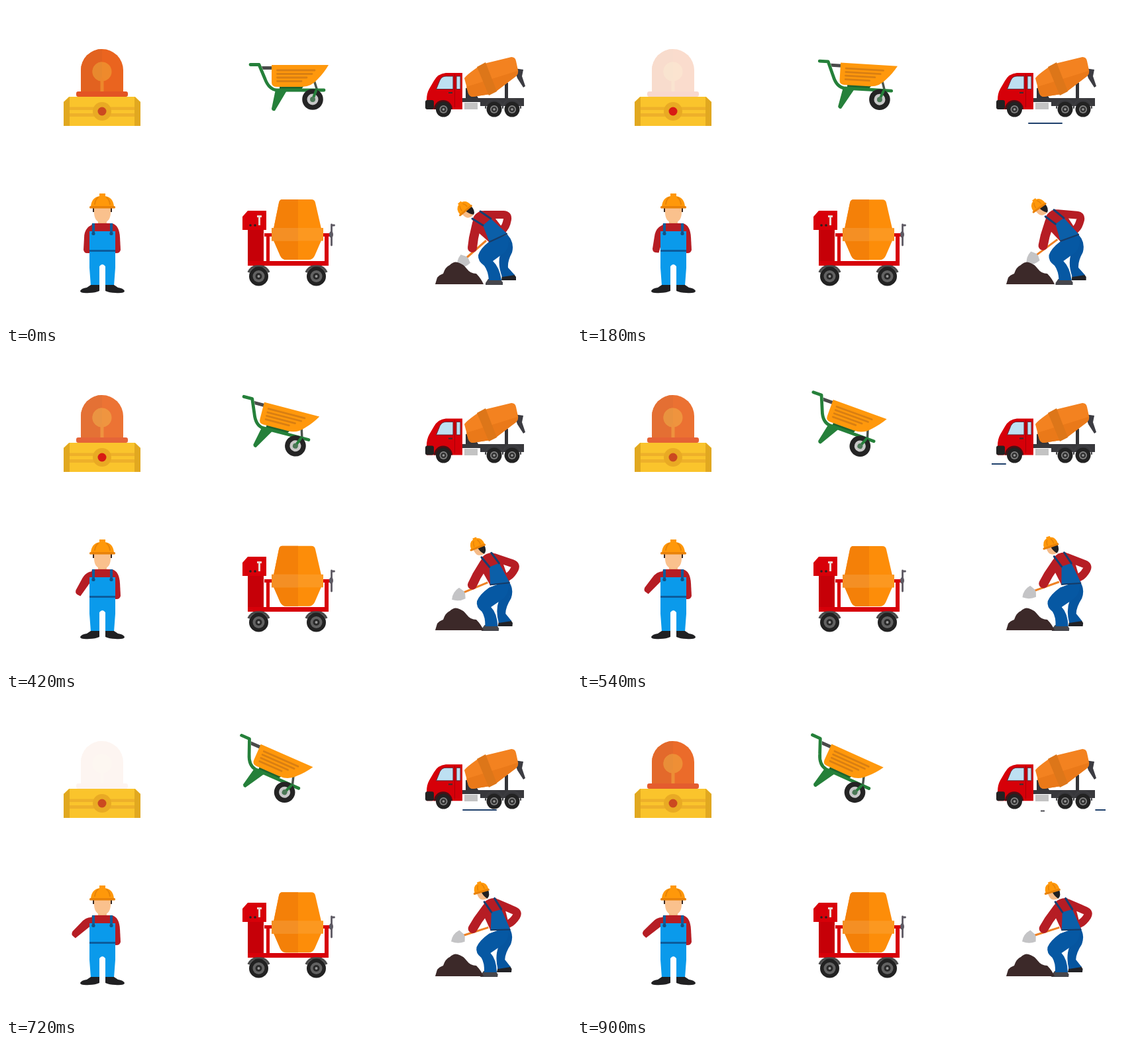
Animation of 853 by 480 pixels, one loop 0.96 s. Source, as an HTML page:

```html
<!DOCTYPE html>
<html lang="en">
<head>
<meta charset="utf-8">
<title>Construction icons</title>
<style>
  html, body { margin: 0; width: 100%; height: 100%; overflow: hidden; background: #fff; }
  svg { display: block; width: 100%; height: 100%; }
  .line { fill: none; stroke-linecap: round; stroke-linejoin: round; }
</style>
</head>
<body>
<svg viewBox="0 0 853 480">
  <defs>
    <clipPath id="road"><rect x="626" y="160" width="172" height="25"/></clipPath>
    <g id="truckWheel">
      <circle r="11.500" fill="#222"/><circle r="6" fill="#858585"/><circle r="4.300" fill="#333"/><circle r="1.800" fill="#999"/>
    </g>
    <g id="mixerWheel">
      <path class="line" d="M-15.500-6Q-11-15-3-15H3Q11-15 15.500-6" stroke="#4a4a4a" stroke-width="3.500" style="stroke-linecap:butt"/>
      <circle r="14.500" fill="#222"/><circle r="9" fill="#626262"/><circle r="5" fill="#292929"/><circle r="2" fill="#999"/>
    </g>
  </defs>

  <!-- Beacon -->
  <g id="dome">
    <path d="M113 130V97A32 32 0 0 1 177 97V130Z" fill="#ea641f"/>
    <path d="M113 130V97A32 32 0 0 1 145 65V130Z" fill="#e26220"/>
    <rect x="106" y="129" width="78" height="8" rx="3" fill="#e35423"/>
    <circle cx="145" cy="99" r="14.500" fill="#ee8a2c"/>
    <path d="M145 84.500A14.500 14.500 0 0 0 145 113.500Z" fill="#e8892e"/>
    <rect x="142.500" y="108" width="5" height="21" fill="#ed882c"/>
  </g>
  <path d="M95 137H195L203 145V181H87V145Z" fill="#fac42c"/>
  <path d="M87 145L96 137V181H87ZM203 145L194 137V181H203Z" fill="#e1a820"/>
  <path d="M96 152.500H194V157H96ZM96 162H194V167H96Z" fill="#eeb02a"/>
  <circle cx="145" cy="159" r="14" fill="#e9aa24"/>
  <circle id="button" cx="145" cy="159" r="6.500"/>

  <!-- Wheelbarrow -->
  <g id="barrow">
    <path d="M386 91H403V96H388Z" fill="#4a4a4a"/>
    <path d="M465 112L470 128" stroke="#4b554d" stroke-width="3.500"/>
    <path d="M413 121H449L446 126H413Z" fill="#1d632f"/>
    <path d="M401 89H487Q480 101 471 110Q461 122 447 122H408Q401 122 401 115Z" fill="#ff980c"/>
    <path class="line" d="M409.500 97H466M409.500 102.500H462M409.500 108H454M409.500 113.500H446" stroke="#d97f12" stroke-width="2.800"/>
    <path d="M407 126H425L406 158Q402 159 401 155Z" fill="#25803a"/>
    <path class="line" d="M369 88.500H382L391 110Q397 126 409 127H480" stroke="#25803a" stroke-width="4.800"/>
    <circle cx="463" cy="141" r="15.800" fill="#242424"/>
    <circle cx="463" cy="141" r="8.500" fill="#c8c8c8"/>
    <path class="line" d="M463 141L468 128" stroke="#25803a" stroke-width="4"/>
    <circle cx="463" cy="141" r="4" fill="#4b7856"/>
  </g>

  <!-- Concrete truck -->
  <g>
    <path d="M753 116H758V140H753ZM694 124H704L713 139H694Z" fill="#343438"/>
    <path d="M767 94L781 96L779 106L784 121L781 123L772 109Z" fill="#3c3c42"/>
    <path d="M692 109Q695 104 714 91L726 86L763 77Q769 77 770 83L773 97Q774 102 770 106L741 128L731 133L705 137Q700 137 698 132Z" fill="#f38220"/>
    <path d="M695 122L772 98Q774 102 770 106L741 128L731 133L705 137Q700 137 698 132Z" fill="#ea7919"/>
    <path d="M711 92L724 85L741 129L729 135Z" fill="#dd7619"/>
    <path d="M688 139H782V145H688ZM716 145H782V151H716Z" fill="#38383c"/>
    <rect x="692" y="146" width="20" height="10" fill="#c3c3c3"/>
    <g id="cab">
      <path d="M689 101H664Q652 102 646 113L639 125Q635 132 635 142V156H689Z" fill="#d60009"/>
      <path d="M649.500 125.500L655 112Q658 106 664 106H675V125.500ZM680 106H686V125.500H680Z" fill="#bde0f2" stroke="#632735" stroke-width="1"/>
      <path d="M677.500 103V153" stroke="#aa0007"/>
      <path d="M668 131H674" stroke="#333" stroke-width="2"/>
      <path d="M646 156A14 14 0 0 1 674 156Z" fill="#4a1015"/>
      <rect x="633" y="142" width="13" height="14" rx="3" fill="#222"/>
    </g>
    <path class="line" d="M724 154A13 13 0 0 1 750 154A13 13 0 0 1 777 154" stroke="#3d3d40" stroke-width="2"/>
    <use href="#truckWheel" x="660.500" y="156"/>
    <use href="#truckWheel" x="737" y="156"/>
    <use href="#truckWheel" x="764" y="156"/>
  </g>
  <g clip-path="url(#road)" fill="#1f406c">
    <rect id="dashA" y="176" width="52" height="2" rx="1"/>
    <rect id="dashB" y="168" width="52" height="2" rx="1"/>
    <rect id="dashC" x="700" y="169.500" width="6" height="2" fill="#4c4c52"/>
  </g>

  <!-- Standing worker -->
  <path id="arm" d="M138 328Q118 331 118 350L117 368Q118 373 122 373H127L132 346Z" fill="#b61d24"/>
  <path d="M130 328H160Q171 331 172 349L173 368Q172 373 167 373H128V336Z" fill="#b61d24"/>
  <path d="M139 320H152V328H139Z" fill="#f0b57f"/>
  <path d="M131 304H160V311H131Z" fill="#382923"/>
  <path d="M133 304H158V313Q157 327 145.500 327Q134 327 133 313Z" fill="#fac18d"/>
  <path d="M128 303Q129 289 141 287V283H150V287Q162 289 163 303Z" fill="#ff980a"/>
  <path class="line" d="M134 299Q135 292 139 289M157 299Q156 292 152 289" stroke="#e78308" stroke-width="2"/>
  <rect x="126" y="302" width="39" height="3.500" rx="1.500" fill="#e98209"/>
  <path d="M126 340H165V395L163 422H150V393Q145.500 387 141 393V422H128L126 395Z" fill="#0a9aeb"/>
  <path d="M130 328H134V342H130ZM157 328H161V342H157ZM126 368H165V371H126Z" fill="#0c5c9c"/>
  <circle cx="132" cy="343.500" r="2.600" fill="#174f80"/>
  <circle cx="159" cy="343.500" r="2.600" fill="#174f80"/>
  <path d="M128 421H141V430Q135 433 126 433Q112 434 112 430Q114 426 122 425ZM163 421H150V430Q156 433 165 433Q179 434 179 430Q177 426 169 425Z" fill="#202022"/>

  <!-- Concrete mixer -->
  <path d="M365 337H389V388H365Z" fill="#c60008"/>
  <path d="M357 318L365 309H393V338H357Z" fill="#d80009"/>
  <path d="M379 316H386V319H384V331H381V319H379Z" fill="#e9d8d3"/>
  <circle cx="369" cy="331" r="1.800" fill="#282020"/><circle cx="376" cy="331" r="1.800" fill="#282020"/>
  <path d="M390 343H402V348H398V386H393V348H390ZM477 343H489V348H487V386H481V348H477ZM365 385H487V392H365Z" fill="#d70009"/>
  <g id="drum">
    <path d="M417 292H461Q466 292 467 297L476 336V354L466 377Q463 383 457 383H423Q417 383 414 377L404 354V336L412 297Q413 292 417 292Z" fill="#fd8d09"/>
    <path d="M441 292H417Q413 292 412 297L404 336V354L414 377Q417 383 423 383H441Z" fill="#f48008"/>
    <rect x="401" y="335" width="78" height="19.500" fill="#fc9820"/>
    <rect x="401" y="335" width="40" height="19.500" fill="#f48f24"/>
  </g>
  <path class="line" d="M491.500 330V361M492 331H495.500" stroke="#5d5963" stroke-width="2.800"/>
  <ellipse cx="491" cy="345" rx="3" ry="5" fill="#5d5963"/>
  <use href="#mixerWheel" x="381.500" y="408"/>
  <use href="#mixerWheel" x="468.500" y="408"/>

  <!-- Digging worker -->
  <g id="legs">
    <path d="M749 405H767L770 409V414H748Z" fill="#222226"/>
    <path d="M728 412H746L750 417V421H724V418Z" fill="#46464c"/>
    <path d="M729 356L757 345Q768 357 764 372Q757 385 758 395L768 406L749 409Q742 390 746 375Z" fill="#06559f"/>
    <path d="M729 356L757 345Q763 365 750 374L735 385Q745 394 748 414H729Q728 400 722 392Q712 385 713 376Q716 366 729 356Z" fill="#0658a3"/>
  </g>
  <g id="digger">
    <path d="M725 354L693 382" stroke="#ee8124" stroke-width="3"/>
    <path transform="translate(693 383) rotate(-46)" d="M5-2L1-10Q-11-9-17 1Q-9 9 2 9L5 2Z" fill="#c4c4c6"/>
    <path class="line" d="M722 315H751Q758 315 757 322Q755 334 749 338" stroke="#b61d24" stroke-width="12"/>
    <path d="M704 322Q708 312 718 309L732 312L756 343L730 357L711 340Z" fill="#b61d24"/>
    <path class="line" d="M711 328L706 350L704 365" stroke="#b61d24" stroke-width="14"/>
    <path d="M720 331L732 321L757 344L730 357Z" fill="#0b5fa8"/>
    <path class="line" d="M720 331L704 321M732 321L716 310" stroke="#153f72" stroke-width="3"/>
    <path class="line" d="M730 356L756 344" stroke="#173a65" stroke-width="2"/>
    <g transform="translate(694 308) rotate(-40)">
      <path d="M-8 0H5V13Q-1 14-5 11Q-8 8-8 0Z" fill="#f5bb88"/>
      <path d="M-1 0H10Q11 10 5 13Q0 8-1 0Z" fill="#202022"/>
      <path d="M-11 0Q-11-11-3-13V-15H3V-13Q11-11 11 0Z" fill="#ff980a"/>
      <path class="line" d="M-5-3Q-5-8-3-10M5-3Q5-8 3-10" stroke="#e78308" stroke-width="1.500"/>
      <rect x="-13" y="-1" width="25" height="3" rx="1.500" fill="#e98209"/>
    </g>
  </g>
  <path d="M648 420L651 410Q654 406 660 404Q663 394 670 391Q676 385 682 387Q690 389 696 397Q701 404 710 404Q717 411 721 420Z" fill="#3c2929"/>
</svg>
<script>
  const LOOP = 960, STEP = 60;
  const el = id => document.getElementById(id);
  const set = (id, name, value) => el(id).setAttribute(name, value);

  // Linear interpolation through [time, value] pairs.
  function track(t, keys) {
    const i = keys.findIndex(key => key[0] > t);
    if (i < 0) return keys[keys.length - 1][1];
    const [t0, a] = keys[i - 1], [t1, b] = keys[i];
    return a + (b - a) * (t - t0) / (t1 - t0);
  }

  const glow = [[0, 1], [180, .22], [240, .15], [300, .35], [420, .9], [480, 1], [600, .83], [720, .06], [900, .95], [960, 1]];
  const lift = [[0, 0], [60, .015], [120, .06], [180, .14], [300, .38], [420, .6], [540, .82], [600, .91], [720, .975], [900, 1]];
  const dig = [[0, 0], [60, .025], [120, .09], [180, .2], [300, .53], [420, .79], [600, .97], [720, 1]];

  function draw(now) {
    const t = Math.floor(now % LOOP / STEP) * STEP;
    const p = track(t, lift), q = track(t, dig);
    set('dome', 'opacity', track(t, glow));
    set('button', 'fill', t > 120 && t < 540 ? '#d81b14' : '#cb4920');
    set('barrow', 'transform', `translate(${-43.5 * p} ${1.3 * p}) rotate(${24.3 * p} 463 141)`);
    set('cab', 'transform', `translate(0 ${-.7 * p})`);
    set('dashA', 'x', 681 + .625 * (t - 180));
    set('dashB', 'x', 627 + .517 * (t - 600));
    set('dashC', 'opacity', t >= 900 ? 1 : 0);
    set('arm', 'transform', `rotate(${42 * p} 130 338)`);
    set('drum', 'transform', `translate(0 ${1.3 * p})`);
    set('digger', 'transform', `rotate(${23.5 * q} 745 358)`);
    set('legs', 'transform', `translate(0 355) skewX(${-6.8 * q}) translate(0 -355)`);
    requestAnimationFrame(() => draw(performance.now()));
  }
  draw(performance.now());
</script>
</body>
</html>
```
